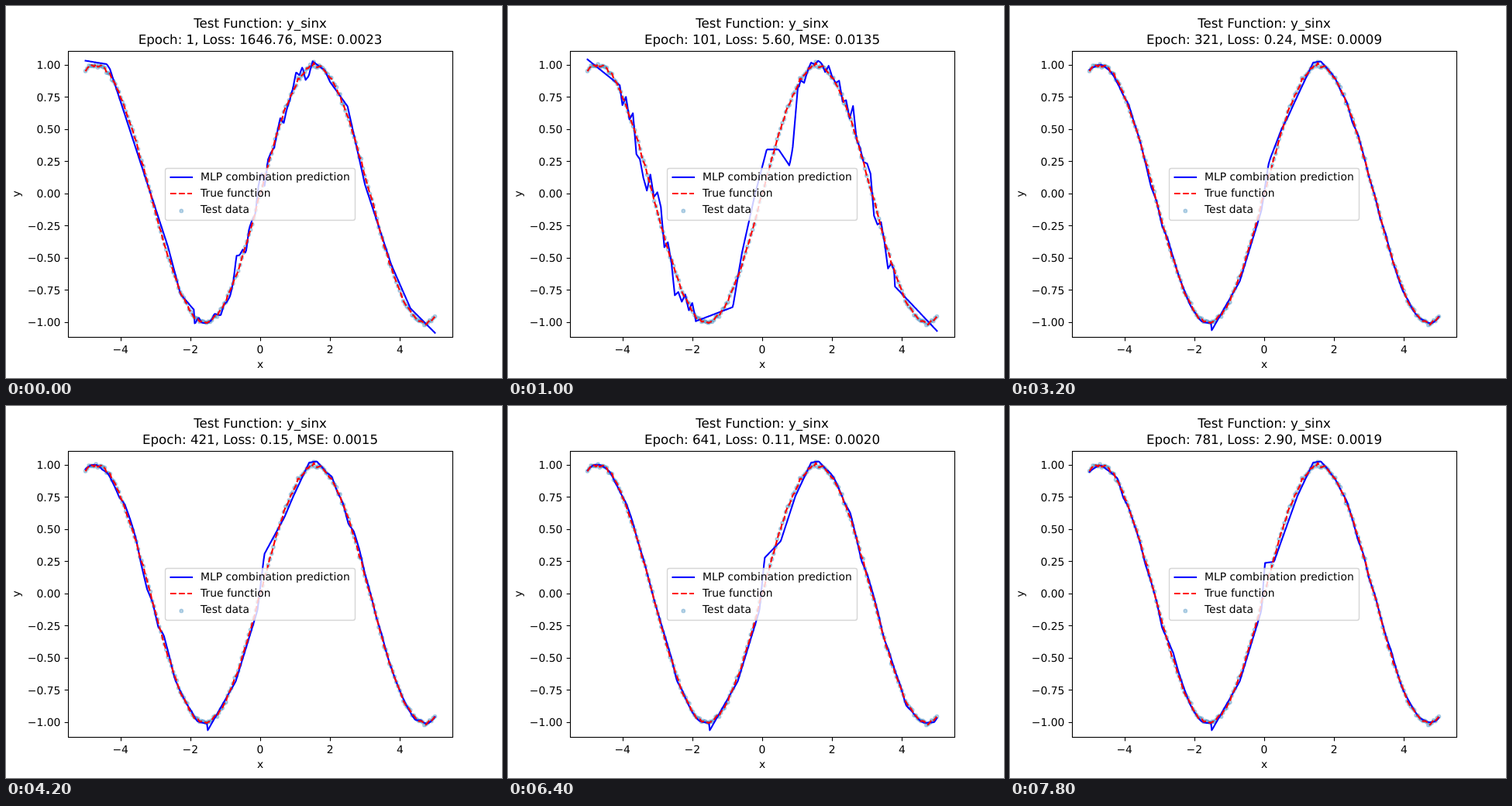
Recreate the animation shown at these times as an HTML page. Size 640 by 480 pixels, loop 8 s.

```html
<!DOCTYPE html>
<html lang="en">
<head>
<meta charset="utf-8">
<title>Curve fitting</title>
<style>
  html, body { margin: 0; width: 100%; height: 100%; overflow: hidden; background: #fff; }
  svg { display: block; width: 640px; height: 480px; font: 13.89px "DejaVu Sans", sans-serif; }
  text { text-rendering: geometricPrecision; }
  .title { font-size: 16.67px; }
  .axis { fill: none; stroke: #000; stroke-width: 1.11; }
  .fit, .truth { fill: none; stroke: #00f; stroke-width: 2.08; stroke-linejoin: round; }
  .fit { stroke-linecap: square; }
  .truth { stroke: #f00; stroke-dasharray: 7.71 3.33; }
  .dot { fill: #1f77b4; stroke: #1f77b4; stroke-width: 1.39; fill-opacity: .3; stroke-opacity: .3; }
  .middle { text-anchor: middle; }
  .end { text-anchor: end; }
</style>
</head>
<body>
<svg id="plot" viewBox="0 0 640 480"></svg>
<script>
const STEP = 200, STEPS = 40;
const plot = document.getElementById('plot');
const toX = x => 328 + x * 45.09;
const toY = y => 242.4 - y * 166;
const snap = v => Math.floor(v + .5) + .5;
const mix = (a, b, k) => a + (b - a) * k;
const mixLog = (a, b, k) => Math.exp(mix(Math.log(a), Math.log(b), k));
const range = (count, make) => Array.from({ length: count }, (_, i) => make(i));

let seed = 7;
const random = () => (seed = (seed * 16807) % 2147483647) / 2147483647;
const noise = size => (random() + random() + random() - 1.5) * 2 * size;

function add(tag, attributes, text = '') {
  const node = document.createElementNS('http://www.w3.org/2000/svg', tag);
  for (const [name, value] of Object.entries(attributes)) node.setAttribute(name, value);
  node.textContent = text;
  return plot.appendChild(node);
}
const label = (x, y, text, style = '') => add('text', { x, y, class: style }, text);
const dot = (cx, cy) => add('circle', { cx, cy, r: 2.2, class: 'dot' });
const toPath = points =>
  'M' + points.map(([x, y]) => toX(x).toFixed(2) + ' ' + toY(y).toFixed(2)).join('L');

// The prediction follows a wobbling sine, except where straight lines replace it.
const xs = range(401, i => i / 40 - 5);

function along(line, x) {
  const i = Math.max(1, line.findIndex(point => point[0] >= x));
  const [x0, y0] = line[i - 1], [x1, y1] = line[i];
  return mix(y0, y1, (x - x0) / (x1 - x0));
}

function wobbler(size, spacing) {
  const kinks = range(Math.ceil(10 / spacing) + 2, () => noise(size));
  return x => {
    const at = (x + 5) / spacing, i = Math.floor(at);
    return mix(kinks[i], kinks[i + 1], at - i) * (.3 + Math.abs(Math.cos(x)));
  };
}

function pose(epoch, loss, mse, wobble, lines) {
  const ys = xs.map(x => {
    const line = lines.find(l => x >= l[0][0] && x <= l[l.length - 1][0]);
    return line ? along(line, x) : Math.sin(x) + wobble(x);
  });
  return { step: (epoch - 1) / 20, loss, mse, ys };
}

// Later fits share one flaw: a shelf just right of zero.
function shelfPose(epoch, loss, mse, start, end) {
  const line = [[-1.5, -1.06], [-.7, -.68], [-.08, -.13], start, end,
    [.95, .76], [1.4, 1.02], [1.62, 1.03], [1.85, .96]];
  return pose(epoch, loss, mse, wobbler(.018, .16), [line]);
}

const poses = [
  pose(1, 1646.76, .0023, wobbler(.055, .09), [
    [[-5, 1.035], [-4.39, 1.008], [-4.3, .97], [-2.64, -.41], [-2.28, -.78], [-1.9, -.9]],
    [[1.5, 1.03], [1.85, .96], [2, .87], [2.5, .68], [3, .07], [3.75, -.55], [4.3, -.89], [5, -1.08]]
  ]),
  pose(101, 5.6, .0135, wobbler(.07, .1), [
    [[-5, 1.045], [-4.06, .84]],
    [[-1.9, -.99], [-.84, -.88], [-.58, -.46], [-.22, -.02], [.13, .345],
      [.47, .345], [.78, .22], [.87, .35], [1.03, .86]],
    [[3.8, -.72], [5, -1.065]]
  ]),
  shelfPose(221, .4, .0005, [.17, .21], [.5, .51]),
  shelfPose(421, .15, .0015, [.12, .31], [.7, .6]),
  shelfPose(541, 12.56, .0016, [.1, .31], [.55, .45]),
  shelfPose(641, .11, .002, [.07, .28], [.53, .41]),
  shelfPose(781, 2.9, .0019, [.02, .24], [.28, .25])
];

const truth = range(200, i => {
  const x = i / 19.9 - 5;
  return [x, Math.sin(x) + noise(.008)];
});
truth.forEach(([x, y]) => dot(toX(x), toY(y + noise(.004))));
const fit = add('path', { class: 'fit' });
add('path', { class: 'truth', d: toPath(truth) });

add('rect', { x: 80.5, y: 58.5, width: 496, height: 369, class: 'axis' });
const signed = (v, digits) => (v < 0 ? '\u2212' : '') + Math.abs(v).toFixed(digits);
for (let v = -4; v <= 4; v += 2) {
  add('path', { class: 'axis', d: `M${snap(toX(v))} 427.5v4.86` });
  label(toX(v), 447.5, signed(v, 0), 'middle');
}
for (let v = -1; v <= 1; v += .25) {
  add('path', { class: 'axis', d: `M80.5 ${Math.floor(toY(v)) + .5}h-4.86` });
  label(70.3, Math.round(toY(v) + 5), signed(v, 2), 'end');
}
label(328, 467, 'x', 'middle');
add('text', { transform: 'translate(17.5 242.4) rotate(-90)', class: 'middle' }, 'y');
label(328, 28, 'Test Function: y_sinx', 'title middle');
const status = label(328, 49, '', 'title middle');

add('rect', { x: 205.5, y: 209.5, width: 245, height: 67, rx: 2.8,
  fill: '#fff', stroke: '#ccc', 'stroke-width': 1.39, opacity: .8 });
add('path', { class: 'fit', d: 'M212.5 221H240' });
add('path', { class: 'truth', d: 'M212 242H240' });
dot(226.3, 264.4);
['MLP combination prediction', 'True function', 'Test data']
  .forEach((text, i) => label(251, 225 + i * 21, text));

function draw(step) {
  const next = poses.findIndex(p => p.step > step);
  const to = poses[next < 0 ? poses.length - 1 : next];
  const from = poses[poses.indexOf(to) - 1];
  const k = (step - from.step) / (to.step - from.step);
  fit.setAttribute('d', toPath(xs.map((x, i) => [x, mix(from.ys[i], to.ys[i], k)])));
  const loss = mixLog(from.loss, to.loss, k).toFixed(2);
  const mse = mixLog(from.mse, to.mse, k).toFixed(4);
  status.textContent = `Epoch: ${1 + step * 20}, Loss: ${loss}, MSE: ${mse}`;
}

let shown = -1;
function tick() {
  const step = Math.floor(performance.now() / STEP) % STEPS;
  if (step !== shown) draw(shown = step);
  requestAnimationFrame(tick);
}
tick();
</script>
</body>
</html>
```
